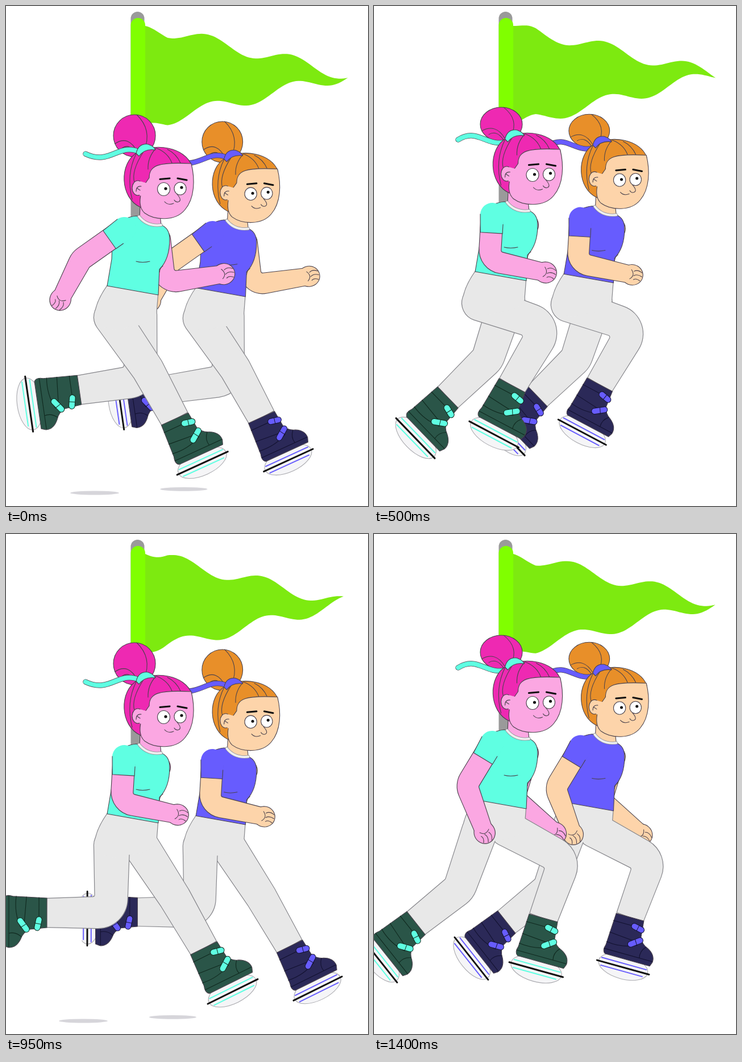
Recreate the animation shown at these times as an HTML page with a canvas. Size 637 by 879 pixels, loop 1.45 s.

```html
<!DOCTYPE html>
<html lang="en">
<head>
<meta charset="utf-8">
<title>Skating runners</title>
<style>
html, body { margin: 0; width: 100%; height: 100%; overflow: hidden; background: #fff; }
canvas { display: block; }
</style>
</head>
<body>
<canvas id="stage" width="637" height="879"></canvas>
<script>
const ctx = document.getElementById('stage').getContext('2d');
const LOOP = 1450, STEP = 50, CYCLE = 16, TAU = 2 * Math.PI;
const INK = '#4a424c', PANTS = '#e8e8e8', SEAM = '#85858a';

// time, stride phase (16 phases make a full stride)
const clock = [[0, 0], [200, 5], [500, 12], [700, 18], [950, 23], [1250, 32], [1400, 37], [LOOP, 38.5]];

// stride phase, ankle x y
const anklePath = [
  [0, 297, 726], [2, 206, 756], [4, 130, 688], [5, 74, 684], [7, 72, 666],
  [8, 129, 675], [10, 226, 698], [12, 243, 667], [13, 298, 675], [15, 348, 728]
];

const girls = [
  { x: 161.5, y: 17.3, sx: .97, sy: .972, skin: '#fdd4aa', hair: '#e88f29', shirt: '#675cfe', boot: '#2b2958', sole: '#12112f' },
  { x: 0, y: 0, sx: 1, sy: 1, skin: '#fba7e2', hair: '#ee29b2', shirt: '#5fffe2', boot: '#2a5548', sole: '#10291f' }
];

const clamp = v => Math.max(0, Math.min(1, v));
const rad = deg => deg * Math.PI / 180;

function sample(keys, p, period) {
  p %= period;
  const i = keys.findLastIndex(k => k[0] <= p);
  const a = keys[i], b = keys[i + 1] || [period, ...keys[0].slice(1)];
  const f = (p - a[0]) / (b[0] - a[0]);
  return a.slice(1).map((v, j) => v + (b[j + 1] - v) * f);
}

function fill(path, color) {
  ctx.fillStyle = color;
  ctx.fill(path);
}

function stroke(path, color = INK, width = 1.1) {
  ctx.strokeStyle = color;
  ctx.lineWidth = width;
  ctx.stroke(path);
}

const line = (d, color, width) => stroke(new Path2D(d), color, width);

function shape(d, color) {
  const path = new Path2D(d);
  fill(path, color);
  stroke(path);
}

function oval(x, y, rx, ry, color, edge = INK) {
  const path = new Path2D();
  path.ellipse(x, y, rx, ry, 0, 0, TAU);
  fill(path, color);
  if (edge) stroke(path, edge);
}

function within(x, y, angle, draw) {
  ctx.save();
  ctx.translate(x, y);
  ctx.rotate(angle);
  draw();
  ctx.restore();
}

// Tapered two-part limb, round outside the bend and sharp inside it.
function limb(hx, hy, kx, ky, ax, ay, [w0, w1, w2], radius) {
  const p = Math.atan2(ky - hy, kx - hx), q = Math.atan2(ay - ky, ax - kx);
  const n = [-Math.sin(p), Math.cos(p)], m = [-Math.sin(q), Math.cos(q)];
  const k = w1 / (1 + Math.max(-.7, Math.cos(q - p)));
  const cx = (n[0] + m[0]) * k, cy = (n[1] + m[1]) * k;
  const inward = Math.sin(q - p) > 0;
  const path = new Path2D();
  path.moveTo(hx + n[0] * w0, hy + n[1] * w0);
  path.arcTo(kx + cx, ky + cy, ax + m[0] * w2, ay + m[1] * w2, inward ? 4 : radius);
  path.lineTo(ax + m[0] * w2, ay + m[1] * w2);
  path.lineTo(ax - m[0] * w2, ay - m[1] * w2);
  path.arcTo(kx - cx, ky - cy, hx - n[0] * w0, hy - n[1] * w0, inward ? radius : 4);
  path.arc(hx, hy, w0, p - Math.PI / 2, p + Math.PI / 2, true);
  path.closePath();
  return path;
}

function drawBoot(g, phase) {
  if (phase > 1.2 && phase < 3.2) {
    line('M8 92Q25 88 38 93', '#222', 2);
  } else {
    oval(12, 90, 46, 22, '#f5f5f7', '#a9a9ae');
    line('M-30 84H54M-28 98H50', g.shirt, 2);
    line('M-37 91H61', '#111', 3);
  }
  shape('M-26 0H26L29 30Q34 42 46 46Q62 54 61 68L58 76H-26Q-33 72 -29 60Z', g.boot);
  line('M-27 14H27M-28 36L20 40M-29 54Q0 58 26 46M-30 67H60M42 45Q33 55 36 67', g.sole);
  for (const d of ['M12 14L26 17', 'M14 47L29 36']) {
    line(d, g.sole, 11.5);
    line(d, g.shirt, 9.5);
  }
  line('M20 11L18 21M20 37L25 45', g.sole, 1);
}

// The knee pushes forward in proportion to how much the leg is shortened.
function drawLeg(g, hx, hy, phase) {
  const [ax, ay] = sample(anklePath, phase, CYCLE);
  const dx = ax - hx, dy = ay - hy, length = Math.hypot(dx, dy);
  const bend = Math.max(3, (214 - length) * 1.65) / length;
  const kx = hx + dx * .53 + dy * bend, ky = hy + dy * .53 - dx * bend;
  const shin = Math.atan2(kx - ax, ay - ky);
  const tilt = shin * Math.min(1, .5 + Math.abs(shin) * .72);
  const path = limb(hx, hy, kx, ky, ax, ay, [31, 28, 25], 52);
  stroke(path, SEAM, 2.4);
  fill(path, PANTS);
  return () => within(ax, ay, tilt, () => drawBoot(g, phase));
}

// Arms swing as pendulums; the forearm follows with a wider arc.
function drawArm(g, x, y, phase, sleeve) {
  const swing = Math.cos(TAU * (phase - 9.5) / CYCLE);
  const upper = rad(114 - 37 * swing), fore = rad(54 - 76 * swing);
  const l1 = 86 - 9 * swing, l2 = 92 + 16 * swing;
  const ex = x + l1 * Math.cos(upper), ey = y + l1 * Math.sin(upper);
  const hx = ex + l2 * Math.cos(fore), hy = ey + l2 * Math.sin(fore);
  const arm = limb(x, y, ex, ey, hx, hy, [19, 19, 15], 42);
  const fist = new Path2D();
  fist.ellipse(hx, hy, 19, 18, fore, 0, TAU);
  for (const part of [arm, fist]) stroke(part, INK, 2.2);
  for (const part of [arm, fist]) fill(part, g.skin);
  within(hx, hy, fore, () => line('M17 -7Q8 -12 2 -7M18 0Q9 -4 3 1M16 8Q8 4 4 8M-3 -9Q6 0 -3 8'));
  if (sleeve) within(x, y, upper, () => {
    fill(new Path2D('M0 -21L32 -20V19L0 21A21 21 0 0 1 0 -21Z'), g.shirt);
    line('M0 21L32 19V-20L16 -20');
  });
}

function drawHead(g, dy, lift, sink) {
  const bx = 226 + sink * .45 - lift * 2, by = 228 + dy + lift * 5, ry = 37 - lift * 7;
  oval(bx, by, 37, ry, g.hair);
  within(bx, by, 0, () => {
    ctx.scale(1, ry / 37);
    line('M4 -37Q32 -10 17 26M-34 14Q-10 -2 6 30M-22 22Q-8 12 4 34');
  });
  const ribbon = `M236 ${257 + dy * .75}C198 ${239 + lift * 11 + sink * 3} 184 ${281 - lift * 68 - sink * 5} ${140 + lift * 8 + sink * 3} ${260 + dy}`;
  line(ribbon, INK, 9.5);
  line(ribbon, g.shirt, 8);
  within(lift * 1.5 + sink * .3, dy, 0, () => {
    shape('M237 354C200 338 198 275 232 257C262 240 315 248 327 281L260 330Z', g.hair);
    line('M229 260Q211 296 222 340M242 256Q220 290 226 310M264 250Q249 266 250 287M265 250Q285 258 292 276M284 252Q300 260 307 276');
    shape('M252 302C252 280 268 274 326 277C333 305 332 338 315 358C298 379 262 377 244 364C235 356 234 344 238 328L245 312Z', g.skin);
    oval(232, 320, 10, 13, g.skin);
    fill(new Path2D('M236 308L250 312L246 336L235 333Z'), g.skin);
    line('M238 317Q229 316 229 326M230 320L236 324');
    oval(277.5, 322, 11, 11.5, '#fff');
    oval(306.5, 321, 10.5, 11, '#fff');
    oval(281, 321, 2.6, 2.6, '#111', null);
    oval(309, 319, 2.6, 2.6, '#111', null);
    line('M271 304.5L288 303M302 303L318 306', '#111', 3.2);
    fill(new Path2D('M298 329Q311 340 304 344Q298 346 295 340Z'), g.skin);
    line('M301 331Q310 341 304 344Q299 346 296 341M279 344Q285 351 295 347');
    shape('M229 259Q233 241 250 243Q261 247 263 253Q244 250 234 264Z', g.shirt);
  });
}

function drawTorso(g) {
  shape('M236 352L235 374Q252 392 273 386L271 366Z', g.skin);
  shape('M229 369C198 373 188 388 187 420L186 445L178 492L268 508L270 463C283 450 288 430 288 410C288 395 281 388 273 385Q247 386 236 370Z', g.shirt);
  line('M234 370Q248 388 273 385', '#8b8b90', 5.5);
  line('M234 370Q248 388 273 385', '#eeeef0', 4);
  line('M229 449Q240 452 253 449M276 457Q271 460 270 468');
}

function drawGirl(g, phase) {
  const near = phase % CYCLE, far = (phase + 8) % CYCLE, half = phase % 8;
  // The body pops up at push-off and sinks over the standing leg.
  const lift = clamp((2.5 - Math.abs(half - 4.5)) / 1.8);
  const sink = 6.5 * Math.max(0, Math.sin(half * Math.PI / 4)) * (1 - lift);
  const dy = sink - 25 * lift;
  const pelvis = new Path2D('M179 491C160 518 150 545 163 561Q190 574 215 564Q250 562 264 545L267 507Z');

  ctx.save();
  ctx.translate(g.x, g.y);
  ctx.scale(g.sx, g.sy);
  ctx.beginPath();
  ctx.rect(-29, 0, 700, 900);
  ctx.clip();

  const glide = (half + 1) % 8;
  if (glide < 3.6) oval(136 + 20 * glide * glide, 856, 43, 3.5, '#d6d5da', null);
  drawArm(g, 270, 410 + dy, far);
  within(0, dy, 0, () => stroke(pelvis, SEAM, 2.4));
  drawLeg(g, 234, 543 + dy, far)();
  const nearBoot = drawLeg(g, 186, 547 + dy, near);
  within(0, dy, 0, () => fill(pelvis, PANTS));
  nearBoot();
  within(0, dy, 0, () => drawTorso(g));
  drawHead(g, dy, lift, sink);
  drawArm(g, 208, 392 + dy, near, true);
  ctx.restore();
}

function drawFlag(t) {
  const pole = new Path2D(), top = new Path2D(), cloth = new Path2D();
  pole.roundRect(219.5, 10, 24, 480, 12);
  top.roundRect(219.5, 21, 25.5, 194, [13, 13, 0, 0]);
  fill(pole, '#9a9a9a');
  fill(top, '#80ff00');

  const tip = 599 + 5 * Math.sin(TAU * (t + 120) / LOOP);
  const crest = 286 + 145 * t / LOOP;
  const edge = (u, start, shift) => {
    const x = 245 + (tip - 245) * u;
    const wave = 11.5 * Math.cos(TAU * (x - crest - shift * (1 - u)) / 145);
    cloth.lineTo(x, start + (121 - start) * u + wave * Math.min(1, u * 9));
  };
  for (let i = 0; i <= 90; i++) edge(i / 90, 35, -4);
  for (let i = 90; i >= 0; i--) edge(i / 90, 208, 4);
  fill(cloth, '#7dea10');
}

function frame(now) {
  const t = Math.floor(now % LOOP / STEP) * STEP;
  const [phase] = sample(clock, t, LOOP);
  ctx.clearRect(0, 0, 637, 879);
  ctx.lineCap = ctx.lineJoin = 'round';
  drawFlag(t);
  for (const girl of girls) drawGirl(girl, phase);
  requestAnimationFrame(frame);
}
requestAnimationFrame(frame);
</script>
</body>
</html>
```
